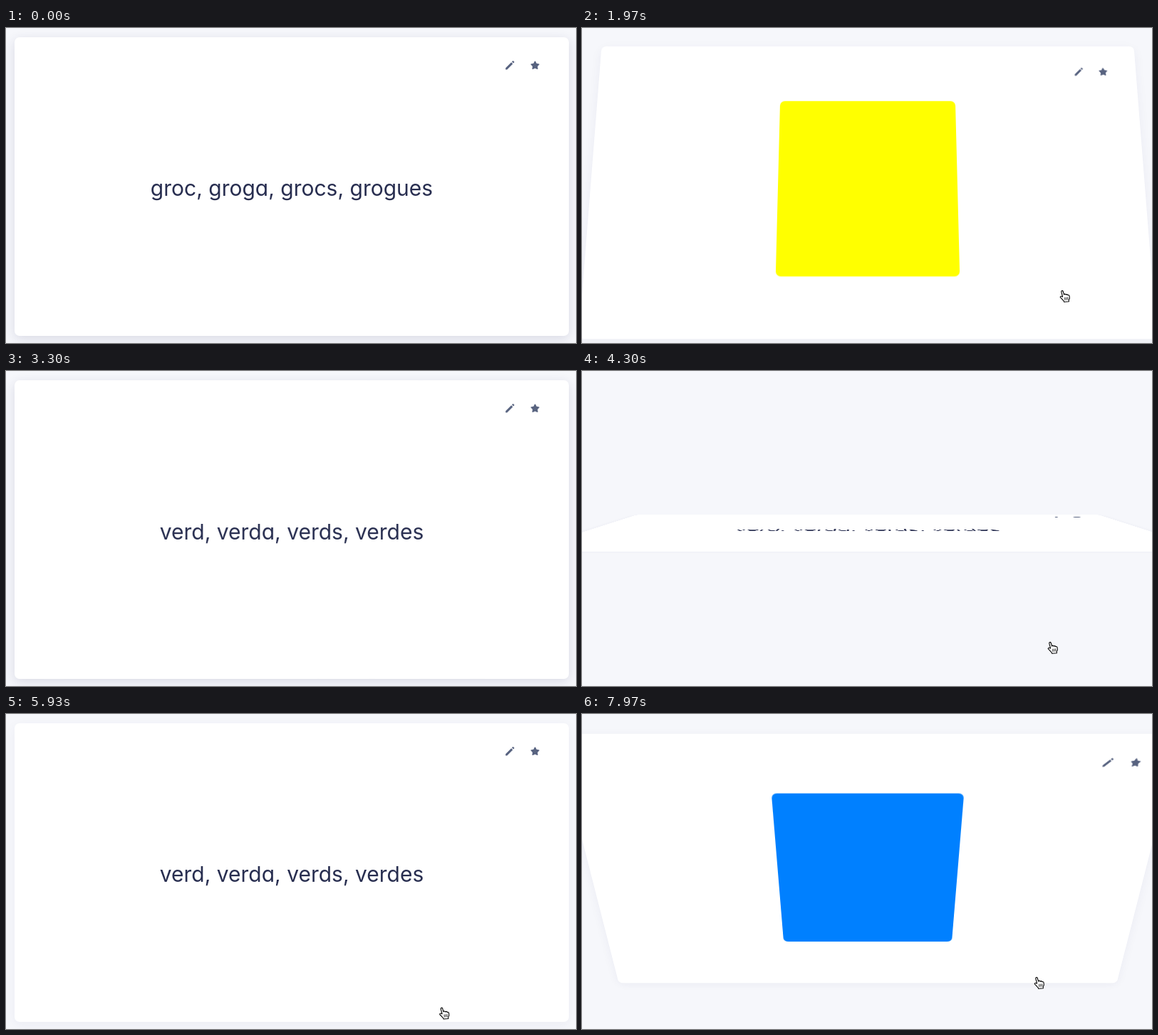
These frames come from a looping animation (800x443 px, 8000 ms). An HTML page:

```html
<!DOCTYPE html>
<html lang="ca">
<head>
<meta charset="utf-8">
<title>Flashcards</title>
<style>
  html, body { margin: 0; width: 100%; height: 100%; overflow: hidden; background: #f6f7fb; }
  #stage {
    position: relative; width: 800px; height: 443px; overflow: hidden;
    perspective: 1050px; perspective-origin: 401px 222.5px;
  }
  #card {
    position: absolute; left: 12px; top: 12.5px; width: 778px; height: 420px;
    border-radius: 7px; background: #fff;
  }
  #word {
    position: absolute; left: 0; right: 0; top: 192.5px;
    text-align: center; white-space: nowrap; color: #282e50;
    font: 400 30px/40px Inter, Lato, sans-serif;
    font-feature-settings: "cv11";
  }
  #swatch {
    position: absolute; left: 263px; top: 84px; width: 252px; height: 252px;
    border-radius: 7px;
  }
  #icons { position: absolute; left: 0; top: 0; }
  #hand { position: absolute; left: 0; top: 0; overflow: visible; }
</style>
</head>
<body>
<div id="stage">
  <div id="card">
    <div id="word"></div>
    <div id="swatch"></div>
    <svg id="icons" width="778" height="420" fill="#586380">
      <path d="M689.2 45.4v-2.1l8-8 2.1 2.1-8 8zM698 34.4l1.2-1.2q.4-.4.8 0l1.3 1.3q.4.4 0 .8l-1.2 1.2z"/>
      <path id="star" stroke="#586380" stroke-width="1.3" stroke-linejoin="round"/>
    </svg>
  </div>
  <svg id="hand" width="16" height="18" stroke="#000" stroke-width="1.1" stroke-linejoin="round" stroke-linecap="round">
    <path fill="#fff" d="M4.6 10 2.8 3.3C2.3 1.3 4.6 .7 5.2 2.5L6.6 7C7 5.8 8.8 5.9 9.2 7.2 9.8 6.2 11.4 6.5 11.8 7.8 12.8 7.2 14 7.8 14.1 9.1L14.3 12.2 13.2 14.6 13.3 16.8 6.6 17.3 6.2 15.8C4.8 14.6 3.4 12.7 1.6 11.2 .6 10.2 1.7 8.9 3 9.4Z"/>
    <path fill="none" stroke-width=".8" d="M7.6 11.2l.2 3.2M9.6 11l.2 3.2M11.6 10.8l.2 3.2"/>
  </svg>
</div>
<script>
const LOOP = 8000, FLIP = 240, SLIDE = 225;

// Times in ms; cursor points are the middle of the hand.
const cards = [
  { word: 'groc, groga, grocs, grogues', color: '#ffff00', start: -SLIDE, flips: [955, 1955],
    enter: [470, 730], exit: [1980, 2480], from: [742, 448], rest: [678, 377], to: [500, 446] },
  { word: 'verd, verda, verds, verdes', color: '#008000', start: 3085, flips: [4190, 5301],
    enter: [3710, 4000], exit: [5690, 6040], from: [600, 456], rest: [661, 389], to: [565, 456] },
  { word: 'atzur, atzur, atzurs, atzurs', color: '#0080ff', start: 6485, flips: [7777],
    enter: [7210, 7500], exit: [9000, 9500], from: [585, 456], rest: [642, 378], to: [560, 456] },
];

const [card, word, swatch, hand, star] =
  ['card', 'word', 'swatch', 'hand', 'star'].map(id => document.getElementById(id));

const progress = (t, from, to) => Math.min(1, Math.max(0, (t - from) / (to - from)));
const easeOut = p => 1 - (1 - p) ** 2;
const mix = (a, b, p) => a.map((v, i) => v + (b[i] - v) * p);

star.setAttribute('d', 'M' + Array.from({ length: 10 }, (_, i) => {
  const radius = i % 2 ? 3 : 5.7, angle = i * Math.PI / 5;
  return [730.5 + radius * Math.sin(angle), 39.8 - radius * Math.cos(angle)].map(v => v.toFixed(2));
}).join('L') + 'Z');

function drawCard(t, current) {
  let colorSide = false, angle = 0;
  for (const start of current.flips) {
    const turn = 180 * progress(t, start, start + FLIP);
    if (turn >= 90) colorSide = !colorSide;
    if (turn > 0 && turn < 180) angle = turn < 90 ? turn : turn - 180;
  }
  const slide = 1 - easeOut(progress(t, current.start, current.start + SLIDE));

  word.textContent = current.word;
  word.style.visibility = colorSide ? 'hidden' : 'visible';
  swatch.style.visibility = colorSide ? 'visible' : 'hidden';
  swatch.style.background = current.color;
  card.style.opacity = 1 - slide;
  card.style.transform = angle ? `rotateX(${angle}deg)`
    : slide ? `translateX(${40 * slide}px) rotateY(${10 * slide}deg)` : 'none';
}

function drawCursor(t, { enter, exit, from, rest, to }) {
  const visible = t >= enter[0] && t < exit[1];
  const [x, y] = t < exit[0]
    ? mix(from, rest, easeOut(progress(t, ...enter)))
    : mix(rest, to, progress(t, ...exit) ** 2);
  hand.style.visibility = visible ? 'visible' : 'hidden';
  hand.style.transform = `translate(${x - 8}px, ${y - 9}px)`;
  card.style.boxShadow = `0 4px 16px rgba(40, 46, 90, ${visible ? .05 : .14})`;
}

function frame() {
  const t = performance.now() % LOOP;
  const current = cards.findLast(c => t >= c.start);
  drawCard(t, current);
  drawCursor(t, current);
  requestAnimationFrame(frame);
}
frame();
</script>
</body>
</html>
```
